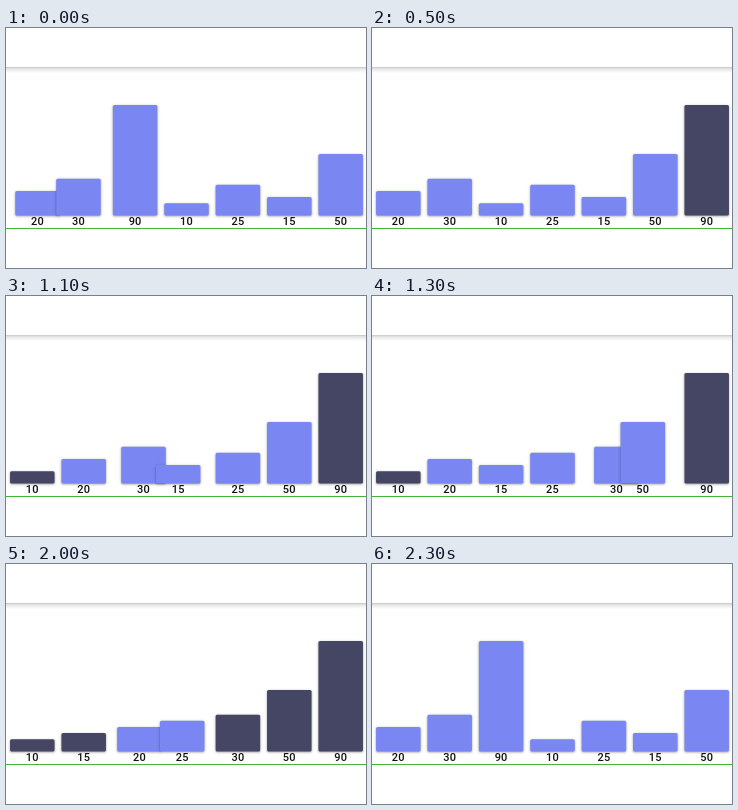
An HTML page with a canvas that plays this animation: 360x240 px, repeating every 2400 ms.

```html
<!DOCTYPE html>
<html lang="en">
<head>
<meta charset="utf-8">
<title>Cocktail shaker sort</title>
<style>
html, body { margin: 0; width: 100%; height: 100%; overflow: hidden; background: #fff; }
canvas { display: block; }
</style>
</head>
<body>
<canvas id="stage" width="360" height="240"></canvas>
<script>
const ctx = document.getElementById('stage').getContext('2d');
const LOOP = 2400, TICK = 100, RESET = -120, STEP = 87;
const PASS_STARTS = [-68, 501, 990, 1390, 1704, 1930];
const PITCH = 51.4, FIRST = 26.3, BAR = 44.5, BASE = 187.5, SCALE = 1.228, NUDGE = 13;
const BLUE = '#7a86f2', DARK = '#444663';

// Run the sort once and record every comparison with its start time.
function record(values) {
  const steps = [];
  let lo = 0, hi = values.length - 1;
  const add = (start, i, swap) => steps.push({ start, i, swap, lo, hi, order: [...values] });
  add(RESET, -1);
  PASS_STARTS.forEach((start, pass) => {
    const forward = pass % 2 === 0, count = hi - lo;
    for (let n = 0; n < count; n++) {
      const i = forward ? lo + n : hi - 1 - n;
      const swap = values[i] > values[i + 1];
      add(start + n * STEP, i, swap);
      if (swap) [values[i], values[i + 1]] = [values[i + 1], values[i]];
    }
    if (forward) hi--; else lo++;
    if (lo === hi) lo++;
    add(start + count * STEP, -1);
  });
  return steps;
}
const steps = record([20, 30, 90, 10, 25, 15, 50]);

function drawBar(value, x, color) {
  const height = value * SCALE;
  ctx.save();
  ctx.shadowColor = 'rgba(0,0,0,.4)';
  ctx.shadowBlur = 2.5;
  ctx.shadowOffsetY = 0.7;
  ctx.fillStyle = color;
  ctx.beginPath();
  ctx.roundRect(x - BAR / 2, BASE - height, BAR, height, 1.5);
  ctx.fill();
  ctx.restore();
}

function drawStage() {
  ctx.fillStyle = '#fff';
  ctx.fillRect(0, 0, 360, 240);
  const shade = ctx.createLinearGradient(0, 39, 0, 45);
  shade.addColorStop(0, '#c6c6c6');
  shade.addColorStop(0.3, '#e6e6e6');
  shade.addColorStop(1, '#fff');
  ctx.fillStyle = shade;
  ctx.fillRect(0, 39, 360, 6);
  ctx.fillStyle = '#45b53c';
  ctx.fillRect(0, 200, 360, 1);
}

function draw(time) {
  const step = steps.findLast(s => s.start <= time);
  const phase = (time - step.start) / STEP;
  const shift = step.swap
    ? PITCH * (1 - Math.cos(Math.PI * phase)) / 2
    : NUDGE * Math.sin(Math.PI * phase) ** 2;
  const centre = k => FIRST + k * PITCH +
    (step.i < 0 ? 0 : k === step.i ? shift : k === step.i + 1 ? -shift : 0);

  drawStage();
  step.order.forEach((value, k) =>
    drawBar(value, centre(k), k < step.lo || k > step.hi ? DARK : BLUE));
  ctx.fillStyle = '#111';
  ctx.font = '500 11px Roboto, sans-serif';
  ctx.letterSpacing = '0.2px';
  ctx.textAlign = 'center';
  step.order.forEach((value, k) => ctx.fillText(value, centre(k), 197));
}

const origin = performance.now();
function frame() {
  const time = Math.floor((performance.now() - origin) % LOOP / TICK) * TICK;
  draw(time >= LOOP + RESET ? time - LOOP : time);
  requestAnimationFrame(frame);
}
frame();
</script>
</body>
</html>
```
